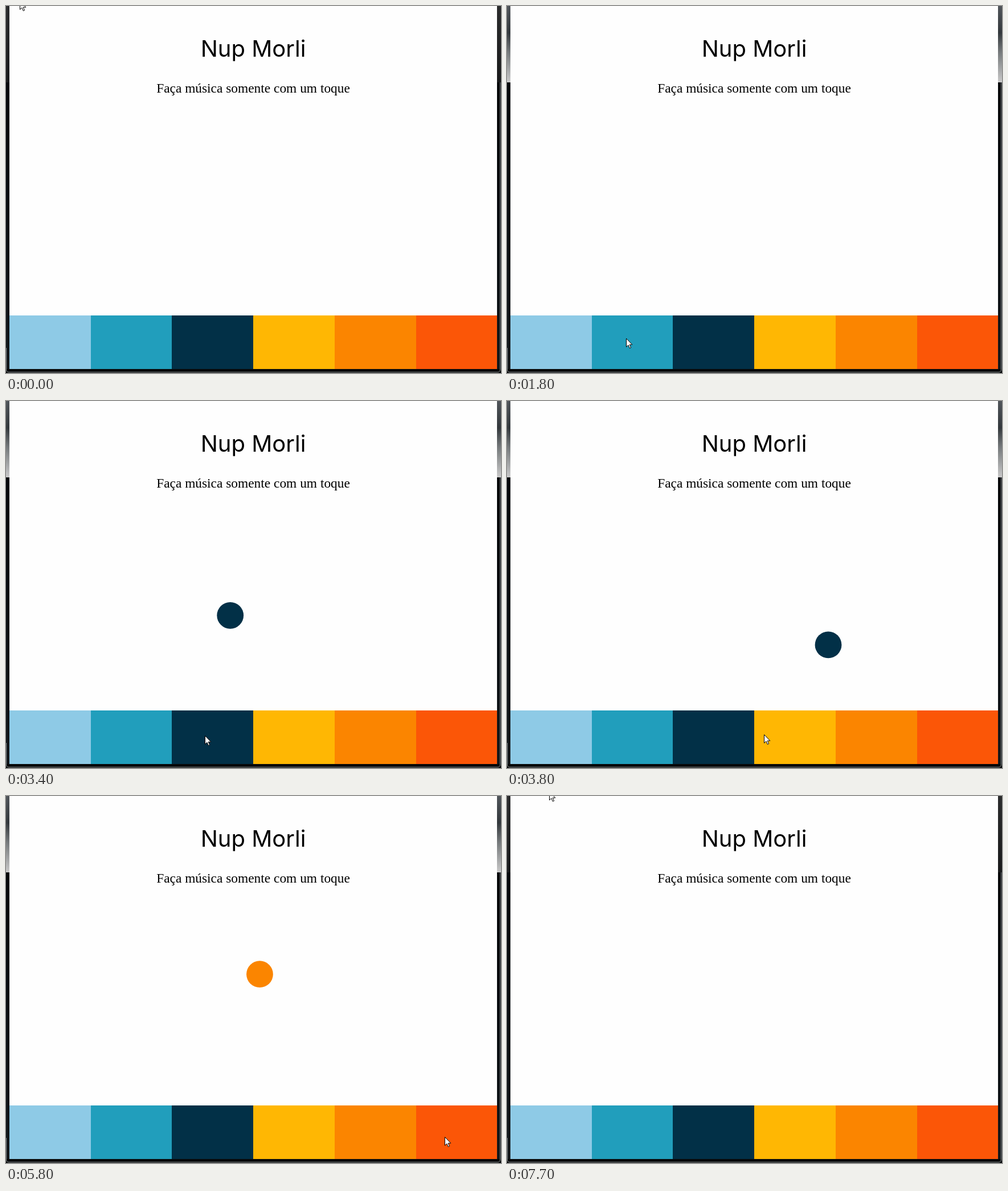
Recreate the animation shown at these times as an HTML page. Size 869 by 644 pixels, loop 7800 ms.

```html
<!DOCTYPE html>
<html lang="pt">
<head>
<meta charset="utf-8">
<title>Nup Morli</title>
<style>
  html, body { margin: 0; width: 100%; height: 100%; overflow: hidden; background: #000; }
  svg { display: block; width: 869px; height: 644px; }
  .title { font: 400 40px Inter, "Open Sans", sans-serif; }
  .sub { font: 23.4px "Liberation Serif", "Times New Roman", serif; }
  text { text-anchor: middle; fill: #000; }
</style>
</head>
<body>
<svg viewBox="0 0 869 644">
  <defs>
    <linearGradient id="dim" x2="0" y2="1">
      <stop offset="0" stop-color="#2b2c2d"/>
      <stop offset="1" stop-color="#191a1b"/>
    </linearGradient>
    <linearGradient id="lit" x2="0" y2="1">
      <stop offset="0" stop-color="#50555a"/>
      <stop offset=".35" stop-color="#33383c"/>
      <stop offset=".6" stop-color="#74787a"/>
      <stop offset="1" stop-color="#c9c9c9"/>
    </linearGradient>
    <linearGradient id="low" x2="0" y2="1">
      <stop offset="0" stop-color="#020305"/>
      <stop offset=".5" stop-color="#060a0e"/>
      <stop offset="1" stop-color="#14191c"/>
    </linearGradient>
  </defs>
  <rect width="869" height="644" fill="url(#low)"/>
  <rect y="637" width="869" height="7" fill="#07090a"/>
  <rect id="glass" width="869" height="134"/>
  <path d="M867.5 134V638Q867.5 642.5 863 642.5H5Q.5 642.5 .5 638V600" fill="none" stroke="#85898b"/>
  <rect x="6" width="856" height="637" fill="#fefefe"/>
  <text class="title" x="434" y="89">Nup Morli</text>
  <text class="sub" x="434" y="152">Faça música somente com um toque</text>
  <g id="balls"></g>
  <g id="pads"></g>
  <path id="cursor" d="M.5 .5V15.2L3.9 12 6.3 17.5 8.6 16.5 6.2 11.2H10.8Z" fill="#fff" stroke="#000" stroke-linejoin="round"/>
</svg>
<script>
const LOOP = 7800, STEP = 100, JUMP = 1000, MOVE = 500;
const PAD = 142.75, R = 23.4;

const NOTES = [
  { fill: '#8ecae6', at: 1020 },
  { fill: '#219ebc', at: 2025 },
  { fill: '#023047', at: 3174 },
  { fill: '#ffb703', at: 4325 },
  { fill: '#fb8500', at: 5437 },
  { fill: '#fb5607', at: 6197 }
];

// Steps on which the picture holds still
const HOLDS = [1200, 2800, 5000, 6100];

// Where the pointer stops: [arrival, x, y]
const STOPS = [
  [200, 24, -9], [500, 565, 270], [800, 84, 571], [1900, 224, 584],
  [2600, 337, 587], [3800, 451, 585], [4900, 629, 588], [5800, 770, 598],
  [6200, 809, 604], [7000, 500, 215], [7700, 74, -8]
];

const $ = id => document.getElementById(id);
const lerp = (a, b, k) => a + (b - a) * k;
const clamp = k => Math.max(0, Math.min(1, k));
const smooth = k => k * k * (3 - 2 * k);
const show = (el, on) => el.setAttribute('visibility', on ? 'visible' : 'hidden');

function add(parent, tag, attrs) {
  const el = document.createElementNS('http://www.w3.org/2000/svg', tag);
  for (const k in attrs) el.setAttribute(k, attrs[k]);
  return $(parent).appendChild(el);
}

// The CSS "ease" curve, cubic-bezier(.25, .1, .25, 1)
function ease(p) {
  let lo = 0, hi = 1, s = .5;
  for (let i = 0; i < 24; i++) {
    s = (lo + hi) / 2;
    if (.75 * s * (1 - s) + s ** 3 < p) lo = s; else hi = s;
  }
  return .3 * s * (1 - s) ** 2 + 3 * s * s * (1 - s) + s ** 3;
}

// Up to the middle, then down on the far side; each half is eased
function jump(p) {
  const half = p < .5 ? 0 : 1;
  const k = ease(2 * p - half);
  return [177.5 + 257 * (half + k), lerp(590, 274, half ? 1 - k : k)];
}

function pointer(t) {
  const i = STOPS.findIndex(s => s[0] >= t);
  if (i < 1) return STOPS[i ? STOPS.length - 1 : 0].slice(1);
  const [from, x0, y0] = STOPS[i - 1], [to, x1, y1] = STOPS[i];
  const begin = Math.max(from, to - MOVE);
  const k = smooth(clamp((t - begin) / (to - begin)));
  return [Math.round(lerp(x0, x1, k)), Math.round(lerp(y0, y1, k))];
}

NOTES.forEach((note, i) => {
  const edge = n => Math.round(5.8 + n * PAD);
  add('pads', 'rect', { x: edge(i), y: 543, width: edge(i + 1) - edge(i), height: 94, fill: note.fill });
  note.ball = add('balls', 'circle', { r: R, fill: note.fill });
});

function draw(t) {
  for (const { ball, at } of NOTES) {
    const p = (t - at) / JUMP;
    show(ball, p >= 0 && p < 1);
    const [x, y] = jump(clamp(p));
    ball.setAttribute('cx', x + R);
    ball.setAttribute('cy', y + R);
  }
  $('cursor').setAttribute('transform', `translate(${pointer(t)})`);
  show($('cursor'), t < 6400 || t > 6800);
  $('glass').setAttribute('fill', t >= 1000 && t < 7600 ? 'url(#lit)' : 'url(#dim)');
}

const start = performance.now();
function tick() {
  const t = Math.floor((performance.now() - start) % LOOP / STEP) * STEP;
  draw(HOLDS.includes(t) ? t - STEP : t);
  requestAnimationFrame(tick);
}
tick();
</script>
</body>
</html>
```
